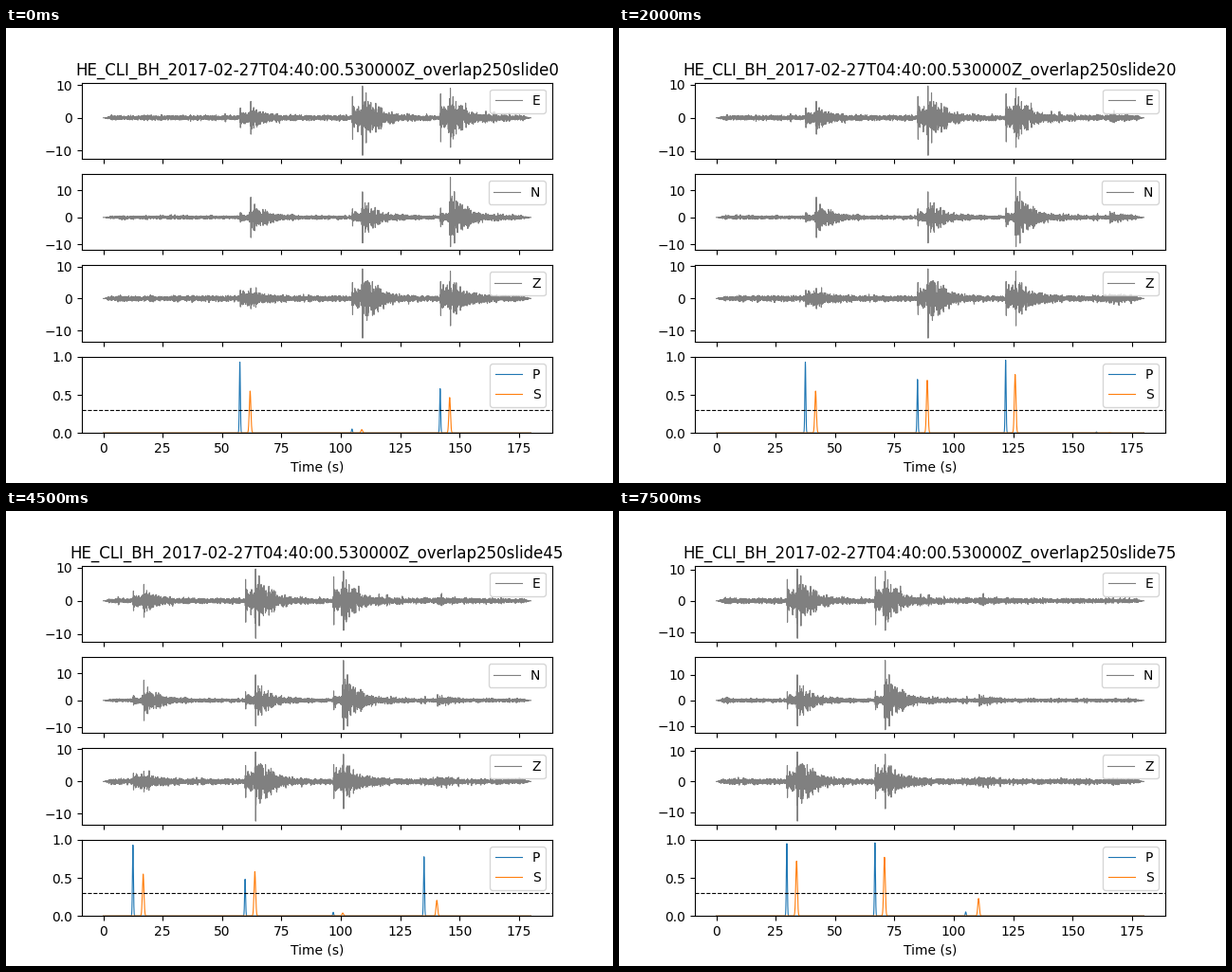
A matplotlib script for the animation above (8000 ms loop, 640 by 480 pixels).

```python
import numpy as np
import matplotlib.pyplot as plt
from matplotlib.animation import FuncAnimation

RATE = 50          # samples per second
SPAN = 180         # visible window, s
STEP = 5           # window shift per frame, s
FRAMES = 16
TITLE = "HE_CLI_BH_2017-02-27T04:40:00.530000Z_overlap250slide{}"

rng = np.random.default_rng(7)
time = np.arange(0, 260, 1 / RATE)
win = np.arange(SPAN * RATE + 1) / RATE
edge = np.clip(np.minimum(win, SPAN - win) / 4, 0, 1)
taper = np.sin(np.pi / 2 * edge) ** 2

P_TIMES = [57.5, 104.7, 141.8, 180.0]
S_TIMES = [61.8, 108.8, 145.8, 185.4]

# noise level, lowest and highest swing, P and S strength of each event
CHANNELS = {
    "E": (0.72, (-11.4, 9.65), (3, 6.5, 7.3, 0.3), (5, 12, 9, 1)),
    "N": (0.6, (-10.88, 14.84), (1.8, 3.2, 3.5, 0.2), (7.5, 9.5, 15, 2.2)),
    "Z": (0.8, (-12.35, 9.25), (2.6, 5, 5.3, 0.4), (3.2, 12.5, 8.5, 1.4)),
}

# per event: peak probability and the (shift, width) spans where it is missed
P_PICKS = [(0.93, []), (0.95, [(4, 15), (54, 10)]),
           (0.96, [(45, 15)]), (0.87, [(80, 15)])]
S_PICKS = [(0.55, [(11, 5)]), (0.72, [(4, 12), (54, 8)]),
           (0.77, [(45, 11)]), (0.23, [])]


def jolt(wave, t, size):
    k = round(t * RATE)
    wave[k], wave[k + 3] = size, -size


def make_trace(noise, limits, p_sizes, s_sizes):
    knots = np.arange(0, 261, 0.5)
    rough = np.exp(0.22 * rng.normal(size=knots.size))
    grain = np.clip(0.4 * rng.normal(size=time.size), -1.3, 1.3)
    grain *= np.interp(time, knots, rough)
    level = np.full(time.size, noise)
    events = list(zip(P_TIMES, S_TIMES, p_sizes, s_sizes))
    for tp, ts, p, s in events:
        lag = np.maximum(time - ts, 0)
        level += 0.4 * p * ((time >= tp) & (time < ts))
        level += 0.5 * s * (time >= ts) * np.exp(-lag / 7)
    wave = np.clip(level * grain, 0.6 * limits[0], 0.6 * limits[1])
    for tp, ts, p, s in events:
        jolt(wave, tp + 0.2, p)
        jolt(wave, ts + 0.3, s)
        for lag in np.arange(1.5, 8, 1.4) + rng.uniform(-0.5, 0.5, 5):
            jolt(wave, ts + lag, s * rng.uniform(0.5, 0.9) * np.exp(-lag / 7))
    return np.clip(wave, *limits)


def picks(table, times, width, shift):
    """Pick curve: weak late in the window, gone once the P wave has left."""
    prob = np.zeros(win.size)
    for (peak, misses), t, tp in zip(table, times, P_TIMES):
        if tp < shift:
            continue
        h = peak / (1 + np.exp((tp - shift - 143.5) / 4))
        for centre, half in misses:
            h *= 1 - 0.95 * np.exp(-((shift - centre) / half) ** 4)
        prob = np.maximum(prob, h * np.exp(-((win + shift - t) / width) ** 2 / 2))
    return prob


def gain(shift):
    """Normalisation grows as the first event leaves the window."""
    return np.interp(shift, [10, 20, 45, 55, 65], [1, 0.995, 0.995, 1, 1.045])


fig, axes = plt.subplots(4, 1, sharex=True, figsize=(6.4, 4.8), dpi=100)
traces = []
for ax, (name, spec) in zip(axes, CHANNELS.items()):
    line, = ax.plot(win, 0 * win, color="gray", lw=0.8, label=name)
    ax.legend(loc="upper right")
    low, top = spec[1]
    pad = 0.05 * (top - low)
    limits = np.array([low - pad, top + pad])
    traces.append((ax, line, make_trace(*spec), limits))

prob_ax = axes[3]
p_line, = prob_ax.plot(win, 0 * win, lw=0.8, label="P")
s_line, = prob_ax.plot(win, 0 * win, lw=0.8, label="S")
prob_ax.axhline(0.3, color="black", ls="--", lw=0.8)
prob_ax.legend(loc="upper right")
prob_ax.set_ylim(0, 1)
prob_ax.set_xlim(-9, 189)
prob_ax.set_xlabel("Time (s)")
title = axes[0].set_title(TITLE.format(0))


def update(i):
    shift = i * STEP
    g = gain(shift)
    start = shift * RATE
    for ax, line, wave, limits in traces:
        line.set_ydata(g * taper * wave[start:start + win.size])
        ax.set_ylim(g * limits)
    p_line.set_ydata(picks(P_PICKS, P_TIMES, 0.2, shift))
    s_line.set_ydata(picks(S_PICKS, S_TIMES, 0.33, shift))
    title.set_text(TITLE.format(shift))
    return []


anim = FuncAnimation(fig, update, frames=FRAMES, interval=500,
                     repeat=True, repeat_delay=0, blit=False)
plt.show()
```
